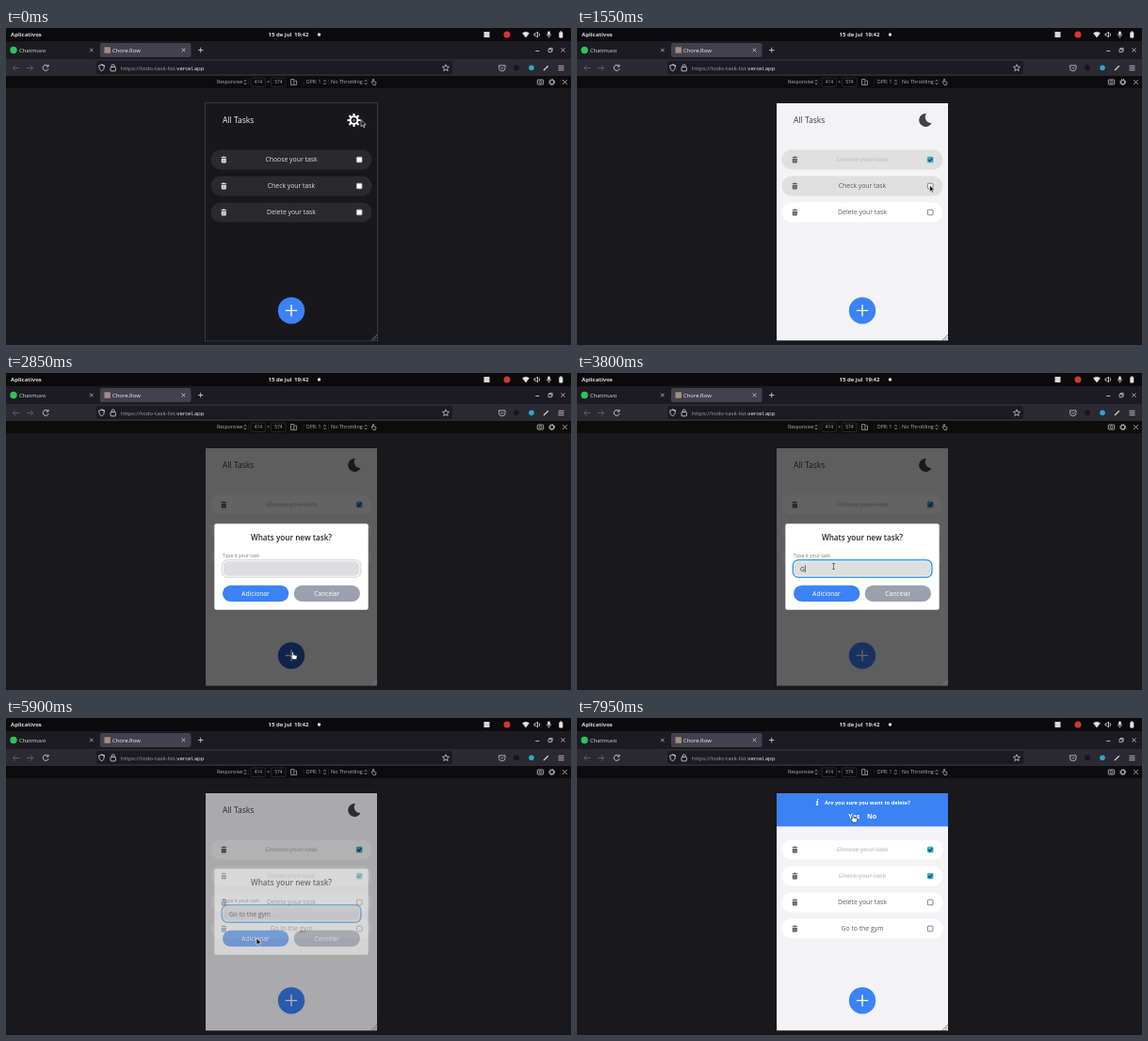
An HTML page that plays this animation: 600x337 px, repeating every 8 s.

```html
<!DOCTYPE html>
<html lang="en">
<head>
<meta charset="utf-8">
<title>Task list demo</title>
<style>
  html, body { margin: 0; width: 100%; height: 100%; overflow: hidden; background: #19181c; }
  svg { display: block; width: 100%; height: 100%; font-family: "Open Sans", "Noto Sans", sans-serif; }
  text { white-space: pre; }
</style>
</head>
<body>
<svg id="stage" viewBox="0 0 600 337" preserveAspectRatio="none"></svg>
<script>
const LOOP = 8000;
const stage = document.getElementById('stage');

// --- building helpers ---
function add(parent, tag, attrs) {
  const el = document.createElementNS('http://www.w3.org/2000/svg', tag);
  set(el, attrs);
  parent.appendChild(el);
  return el;
}
function set(el, attrs) {
  for (const k in attrs) el.setAttribute(k, attrs[k]);
}
const group = (p, attrs = {}) => add(p, 'g', attrs);
const rect = (p, x, y, width, height, fill, rx = 0, more = {}) =>
  add(p, 'rect', { x, y, width, height, fill, rx, ...more });
const disc = (p, cx, cy, r, fill, more = {}) => add(p, 'circle', { cx, cy, r, fill, ...more });
const line = (p, d, stroke, width = 0.8, more = {}) =>
  add(p, 'path', { d, stroke, 'stroke-width': width, fill: 'none', ...more });
function label(p, x, y, size, str, fill, weight = 400, anchor = 'start') {
  const el = add(p, 'text', { x, y, fill, 'font-size': size, 'font-weight': weight, 'text-anchor': anchor });
  el.textContent = str;
  return el;
}
const show = (el, on) => el.setAttribute('visibility', on ? 'inherit' : 'hidden');

// --- motion helpers ---
const clamp = v => Math.max(0, Math.min(1, v));
const ramp = (t, from, dur) => clamp((t - from) / dur);
const smooth = u => u * u * (3 - 2 * u);
const easeOut = u => 1 - (1 - u) ** 2;
const mix = (a, b, u) => a + (b - a) * u;
function blend(a, b, u) {
  return 'rgb(' + a.map((v, i) => Math.round(mix(v, b[i], u))) + ')';
}

// --- desktop bar ---
const chrome = group(stage);
rect(chrome, 0, 0, 600, 337, '#19181c');
rect(chrome, 0, 0, 600, 14, '#0b0a0d');
label(chrome, 5, 9.2, 6, 'Aplicativos', '#dedede', 700);
label(chrome, 278.5, 9.2, 6, '15 de jul', '#dedede', 700);
label(chrome, 306, 9.2, 6, '19:42', '#dedede', 700);
disc(chrome, 332.5, 7, 1.7, '#e4e4e4');
rect(chrome, 507.5, 4, 6, 6, '#d8d8d8');
disc(chrome, 532, 7, 3.5, '#d2382f');
line(chrome, 'M548.5 5.5Q552 2.8 555.5 5.5L552 10Z', '#e4e4e4', 0.5, { fill: '#e4e4e4' });
line(chrome, 'M561 6H562.5L564.5 4V10L562.5 8H561ZM566 5.3Q567.3 7 566 8.7', '#e4e4e4');
rect(chrome, 575.2, 3.5, 2.6, 4.3, '#e4e4e4', 1.3);
line(chrome, 'M574.2 6.5Q574.5 9 576.5 9T578.8 6.5M576.5 9V10.6', '#e4e4e4', 0.6);
rect(chrome, 587.3, 4.2, 4, 6.4, '#e4e4e4', 0.8);
rect(chrome, 588.4, 3.4, 1.8, 1, '#e4e4e4');

// --- browser tabs ---
rect(chrome, 0, 14, 600, 19, '#1c1b22');
disc(chrome, 8, 23.5, 3.7, '#2fc35a');
label(chrome, 14, 25.8, 5.9, 'Chatmuvo', '#dcdce0');
line(chrome, 'M89 21.7L92.6 25.3M92.6 21.7L89 25.3', '#d0d0d4', 0.7);
rect(chrome, 100, 16, 96.5, 15, '#42414d', 2);
rect(chrome, 104.5, 20.3, 6.4, 6.4, '#a98c80');
label(chrome, 113, 25.8, 5.9, 'Chore.Row', '#f2f2f4');
line(chrome, 'M186.7 21.7L190.3 25.3M190.3 21.7L186.7 25.3', '#e4e4e8', 0.7);
line(chrome, 'M204 23.5H209.4M206.7 20.8V26.2', '#dadade');
line(chrome, 'M562.3 24.5H566.3', '#dadade');
line(chrome, 'M576 22.5H579.2V25.7H576ZM577 22.3V21.4H580.2V24.6H579.4', '#dadade', 0.7);
line(chrome, 'M589.5 21.5L593.5 25.5M593.5 21.5L589.5 25.5', '#dadade', 0.8);

// --- address bar ---
rect(chrome, 0, 33, 600, 18, '#2b2a33');
rect(chrome, 96, 35, 378, 14, '#1c1b22', 2);
line(chrome, 'M14 42.5H7.5M10.3 39.6L7.4 42.5L10.3 45.4', '#686770');
line(chrome, 'M22 42.5H28.5M25.7 39.6L28.6 42.5L25.7 45.4', '#686770');
line(chrome, 'M44.6 40.5A3 3 0 1 0 45.1 43.2M45 38.8V41H42.8', '#e2e2e6');
line(chrome, 'M101.5 39L104.5 40L101.5 39L98.6 40Q98.6 44.5 101.5 46Q104.5 44.5 104.5 40Z', '#dedee2', 0.8);
rect(chrome, 111, 41.5, 5.4, 4.3, 'none', 0.8, { stroke: '#dedee2', 'stroke-width': 0.8 });
line(chrome, 'M112.2 41.5V40.3A1.5 1.5 0 0 1 115.2 40.3V41.5', '#dedee2');
const url = label(chrome, 122, 44.6, 6.1, '', '#a2a1a9');
[['https://todo-task-list.', '#a2a1a9'], ['vercel.app', '#f0f0f2']].forEach(([str, fill]) => {
  add(url, 'tspan', { fill }).textContent = str;
});
let star = '';
for (let i = 0; i < 10; i++) {
  const a = -Math.PI / 2 + i * Math.PI / 5, r = i % 2 ? 1.7 : 3.7;
  star += (i ? 'L' : 'M') + (467 + r * Math.cos(a)).toFixed(2) + ' ' + (42.5 + r * Math.sin(a)).toFixed(2);
}
line(chrome, star + 'Z', '#dedee2', 0.7);
line(chrome, 'M523.5 39.8H530V42.5A3.2 3.2 0 0 1 523.5 42.5ZM525.2 41.8L526.8 43.3L528.4 41.8', '#dedee2', 0.7);
disc(chrome, 542, 42.3, 3, '#17161c');
disc(chrome, 558, 42.3, 2.8, '#2aa9cc');
line(chrome, 'M571 45L575.8 40.3', '#cfcfd4', 1.3);
line(chrome, 'M586.5 40.3H592.5M586.5 42.5H592.5M586.5 44.7H592.5', '#dedee2', 0.8);

// --- device toolbar ---
rect(chrome, 0, 51, 600, 13, '#0c0c0d');
const tool = '#b4b4b8';
label(chrome, 224, 59.3, 5.15, 'Responsive', tool);
label(chrome, 319, 59.3, 5, 'DPR: 1', tool);
label(chrome, 345, 59.3, 5.5, 'No Throttling', tool);
for (const x of [254, 338.5, 382]) {
  line(chrome, `M${x - 1.2} 56.8L${x} 55.2L${x + 1.2} 56.8M${x - 1.2} 58.4L${x} 60L${x + 1.2} 58.4`, tool, 0.7);
}
rect(chrome, 260, 53, 15.5, 9.5, '#0c0c0d', 1, { stroke: '#3a3a3e', 'stroke-width': 0.6 });
rect(chrome, 281.5, 53, 15.5, 9.5, '#0c0c0d', 1, { stroke: '#3a3a3e', 'stroke-width': 0.6 });
label(chrome, 267.8, 59.3, 4.8, '414', tool, 400, 'middle');
label(chrome, 278.5, 59.3, 4.8, '×', tool, 400, 'middle');
label(chrome, 289.3, 59.3, 4.8, '574', tool, 400, 'middle');
line(chrome, 'M302.5 54.5H305.8V60.5H302.5ZM306.5 56H308.5V60.5H306', tool, 0.7);
line(chrome, 'M389 59L388 57L389.5 57.2V54.5H390.7V57L393 57.6L392.5 60.5H390Z', tool, 0.7);
rect(chrome, 564.3, 55, 6.4, 5, 'none', 0.8, { stroke: '#d0d0d4', 'stroke-width': 0.8 });
disc(chrome, 567.5, 57.5, 1.3, 'none', { stroke: '#d0d0d4', 'stroke-width': 0.7 });
disc(chrome, 579.7, 57.5, 2.1, 'none', { stroke: '#d0d0d4', 'stroke-width': 1 });
disc(chrome, 579.7, 57.5, 3, 'none', { stroke: '#d0d0d4', 'stroke-width': 1, 'stroke-dasharray': '1.18 1.18' });
line(chrome, 'M591.2 55.2L595.8 59.8M595.8 55.2L591.2 59.8', '#d0d0d4', 0.8);
for (const x of [257.5, 316, 342.5, 384.8]) line(chrome, `M${x} 54V61`, '#2a2a2d', 0.5);

// --- app page ---
const clip = add(add(stage, 'defs', {}), 'clipPath', { id: 'view' });
rect(clip, 212, 80, 182, 252.4);
const frame = rect(stage, 211.6, 79.7, 182.8, 253, 'none', 0, { stroke: '#444348', 'stroke-width': 0.8 });
const page = group(stage, { 'clip-path': 'url(#view)' });
const back = rect(page, 212, 80, 182, 252.4, '#18171b');
const title = label(page, 230, 101, 8.55, 'All Tasks', '#fff');

const sun = group(page);
disc(sun, 369.5, 98, 3.9, 'none', { stroke: '#fff', 'stroke-width': 2 });
for (let a = 0; a < 360; a += 45) {
  line(sun, 'M369.5 93.6V91', '#fff', 2.1, { transform: `rotate(${a} 369.5 98)` });
}
disc(sun, 369.5, 98, 1.2, '#7b7b7e');
const moon = line(page, 'M371 91A7 7 0 1 0 376.5 101A6.3 6.3 0 0 1 371 91Z', 'none', 0, { fill: '#414045' });

const TRASH = 'M228.4-2.7H230L230.4-3.5H232.2L232.6-2.7H234.2V-1.9H228.4ZM228.8-1.3H233.8V2.8Q233.8 3.6 233 3.6H229.6Q228.8 3.6 228.8 2.8Z';
const rows = ['Choose your task', 'Check your task', 'Delete your task', 'Go to the gym'].map((str, i) => {
  const g = group(page, { transform: `translate(0 ${140 + 28 * i})` });
  const row = { g };
  row.bg = rect(g, 217.5, -10.5, 171, 21, '#2a292d', 10.5);
  row.bin = line(g, TRASH, 'none', 0);
  row.slots = line(g, 'M230.5-.2V2.6M232.1-.2V2.6', '#777', 0.4);
  row.text = label(g, 303, 2.4, 6.85, str, '#fff', 400, 'middle');
  row.box = rect(g, 372.4, -2.8, 5.6, 5.6, '#fff', 0.8, { 'stroke-width': 0.8 });
  row.tick = line(g, 'M373.4 .1L374.7 1.5L377.2-1.5', '#182b35', 1.1);
  return row;
});

const plus = disc(page, 303, 300.4, 14.2, '#3b82f6');
line(page, 'M296.8 300.4H309.2M303 294.2V306.6', '#fff', 1.4);

// --- delete banner ---
const banner = group(page);
rect(banner, 212, 80, 182, 35.3, '#3b82f6');
add(banner, 'text', {
  x: 253.6, y: 92.8, fill: '#fff', 'font-size': 9, 'font-weight': 700, 'font-style': 'italic',
  'font-family': '"Noto Serif", serif'
}).textContent = 'i';
label(banner, 263, 91.8, 5.55, 'Are you sure you want to delete?', '#fff', 700);
label(banner, 288.3, 106.8, 7.2, 'Yes', '#fff', 700);
label(banner, 308, 106.8, 7.2, 'No', '#fff', 700);

// --- new task dialog ---
const shade = rect(page, 212, 80, 182, 252.4, '#000');
const dialog = group(page);
rect(dialog, 221.3, 160.3, 163.4, 91.5, '#fff', 2);
label(dialog, 303, 178.3, 8.2, 'Whats your new task?', '#26262a', 600, 'middle');
label(dialog, 230, 195.6, 5.1, 'Type it your task', '#77777c');
const ring = rect(dialog, 229.3, 198.7, 147.6, 18.6, '#fff', 6, { stroke: '#3d9cf0', 'stroke-width': 1.5 });
rect(dialog, 230.8, 200.2, 144.6, 15.6, '#dedee0', 5);
const typed = label(dialog, 237, 210.6, 6.7, '', '#2e2e32');
const caret = line(dialog, 'M0 204.3V212.2', '#222', 0.6);
rect(dialog, 230, 225.7, 70.3, 17.4, '#3b82f6', 8.7);
rect(dialog, 305.7, 225.7, 70.3, 17.4, '#9aa1ad', 8.7);
label(dialog, 265, 236.9, 6.75, 'Adicionar', '#fff', 500, 'middle');
label(dialog, 340.8, 236.9, 6.65, 'Cancelar', '#fff', 500, 'middle');

const grip = line(stage, 'M388 332L394 326M390.5 332L394 328.5', '#77767a', 0.9);

// --- pointer shapes, tip at 0,0 ---
const pointer = group(stage);
const shapes = {
  arrow: line(pointer, 'M0 0V7.2L1.7 5.7L2.8 8.2L4 7.7L2.9 5.2H5.2Z', '#fff', 0.6, { fill: '#111' }),
  hand: line(pointer, 'M-.8 .3Q0-.6 .8 .3V2.7L4 3.4Q4.8 3.7 4.6 4.6L4 7.5H.2L-2.2 4.6Q-1.8 3.6-.8 4.3Z', '#222', 0.6, { fill: '#fff' }),
  beam: line(pointer, 'M-1.4-3H1.4M0-3V3M-1.4 3H1.4', '#444', 0.7)
};

// [time, x, y]
const PATH = [
  [0, 377, 97.5], [50, 377, 97.5], [100, 370.5, 97.5], [650, 370.5, 97.5],
  [1050, 374.5, 139], [1300, 374.5, 139], [1500, 374.5, 167], [1680, 374.5, 167],
  [2050, 304.5, 297], [2850, 304.5, 297], [3250, 272.5, 205.5], [5050, 272.5, 205.5],
  [5400, 266, 234], [5900, 266, 234], [6300, 302.5, 220], [6550, 302.5, 220],
  [7050, 231, 222.5], [7400, 231, 222.5], [7850, 293, 103.5], [8000, 293, 103.5]
];
function pointAt(t) {
  const i = PATH.findIndex(p => p[0] > t);
  const a = PATH[i - 1], b = PATH[i], u = smooth(ramp(t, a[0], b[0] - a[0]));
  return [mix(a[1], b[1], u), mix(a[2], b[2], u)];
}
function shapeAt(t) {
  if (t >= 3100 && t < 5200) return 'beam';
  const hand = [[100, 750], [1900, 2950], [5300, 5800], [6950, 7450], [7750, 8000]];
  return hand.some(([a, b]) => t >= a && t < b) ? 'hand' : 'arrow';
}

const TASK = 'Go to the gym';
const DONE_AT = [1200, 1600];
// [start, end] of the hover on each row
const HOVER = [[950, 2450], [1450, 1650], null, [5950, 7450]];

function render(t) {
  const k = ramp(t, 300, 300), light = 1 - (1 - k) ** 1.8;
  const dark = t < 300;
  set(back, { fill: blend([24, 23, 27], [243, 242, 245], light) });
  show(frame, light < 0.5);
  set(title, { fill: blend([240, 240, 242], [62, 61, 66], light) });
  show(sun, dark);
  show(moon, !dark);

  rows.forEach((row, i) => {
    show(row.g, i < 3 || t >= 5750);
    const done = t >= DONE_AT[i];
    const h = HOVER[i];
    const hover = h ? ramp(t, h[0], 100) * (1 - ramp(t, h[1], i ? 150 : 300)) : 0;
    const shadeTo = 255 - 31 * hover;
    set(row.bg, { fill: blend([42, 41, 45], [shadeTo, shadeTo, shadeTo], light) });
    set(row.bin, { fill: blend([232, 232, 234], [88, 88, 92], light) });
    set(row.slots, { stroke: blend([42, 41, 45], [230, 230, 230], light) });
    set(row.text, {
      fill: done ? '#c6c6c8' : blend([222, 222, 224], [92, 92, 96], light),
      'text-decoration': done ? 'line-through' : 'none'
    });
    set(row.box, { fill: done ? '#35b4cf' : '#fff', stroke: done ? '#2a9db8' : dark ? '#b5b5b8' : '#66666a' });
    show(row.tick, done);
  });

  const press = ramp(t, 1950, 150) * (1 - ramp(t, 2850, 150));
  set(plus, { fill: blend([59, 130, 246], [37, 94, 190], press) });

  const open = ramp(t, 2490, 350) * (1 - ramp(t, 5750, 300));
  set(shade, { opacity: 0.61 * open * (t < 4000 ? open : 1) });
  set(dialog, { opacity: open });
  show(dialog, open > 0);

  const focused = t >= 3400;
  set(ring, { stroke: focused ? '#3d9cf0' : '#dedee0' });
  const count = t < 3700 ? 0 : t < 3950 ? 1 : Math.min(TASK.length, 2 + Math.floor((t - 3950) / 85));
  const str = TASK.slice(0, count);
  if (typed.textContent !== str) typed.textContent = str;
  const width = count ? typed.getComputedTextLength() : 0;
  set(caret, { transform: `translate(${237.5 + width} 0)` });
  show(caret, open > 0 && focused && t < 4950);

  const drop = easeOut(ramp(t, 7400, 300));
  set(banner, { transform: `translate(0 ${-36 * (1 - drop)})` });
  show(banner, drop > 0);

  const [x, y] = pointAt(t);
  set(pointer, { transform: `translate(${x} ${y})` });
  const now = shapeAt(t);
  for (const name in shapes) show(shapes[name], name === now);
}

const start = performance.now();
function tick(now) {
  render(Math.max(0, now - start) % LOOP);
  requestAnimationFrame(tick);
}
render(0);
requestAnimationFrame(tick);
</script>
</body>
</html>
```
